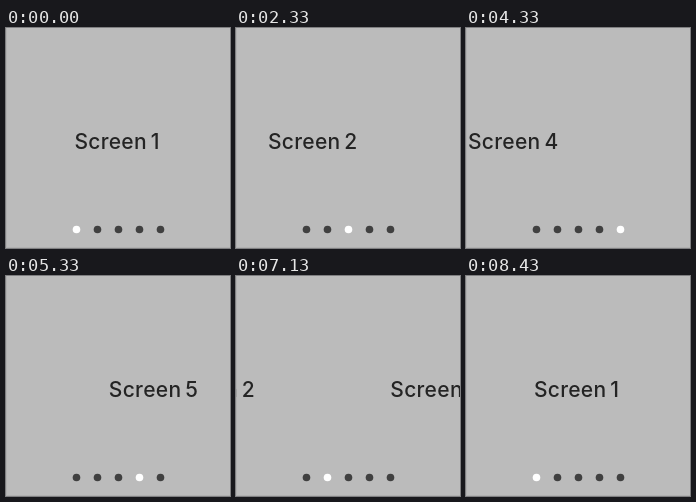
Recreate the animation shown at these times as an HTML page. Size 224 px wide and 220 px high, loop 8.53 s.

```html
<!DOCTYPE html>
<html lang="en">
<head>
<meta charset="utf-8">
<title>Paged screens</title>
<style>
  html, body { margin: 0; width: 100%; height: 100%; overflow: hidden; background: #bbb; }
  svg { display: block; width: 224px; height: 220px; overflow: hidden; }
  text { font: 500 21px Inter, sans-serif; letter-spacing: .3px; word-spacing: -2px; fill: #242424; }
  .edge { fill: #b0b0b0; }
</style>
</head>
<body>
<svg viewBox="0 0 224 220">
  <rect width="224" height="220" fill="#bbb"/>
  <rect class="edge" width="1" height="220"/>
  <rect class="edge" y="219" width="224" height="1"/>
  <g id="pages"></g>
  <g id="dots"></g>
</svg>
<script>
const LOOP = 8530, TICK = 100, PHASE = 30, SLIDE = 500, PAGE = 225, COUNT = 5;

// [start ms, page to go to]
const moves = [
  [1256, 1], [2262, 2], [3262, 3], [4231, 4],
  [5262, 3], [6132, 2], [7010, 1], [7962, 0]
];

const pages = document.getElementById('pages');
const dotGroup = document.getElementById('dots');
const dots = [];

function add(parent, tag, attrs) {
  const el = document.createElementNS('http://www.w3.org/2000/svg', tag);
  for (const key in attrs) el.setAttribute(key, attrs[key]);
  return parent.appendChild(el);
}

for (let i = 0; i < COUNT; i++) {
  const label = add(pages, 'text', { x: i * PAGE + (i ? 67.4 : 68.4), y: 120.7 });
  label.textContent = 'Screen ' + (i + 1);
  dots.push(add(dotGroup, 'circle', { cx: 70.5 + 21 * i, cy: 201.5, r: 3.8 }));
}

const bezier = (a, b, s) =>
  3 * a * s * (1 - s) ** 2 + 3 * b * s * s * (1 - s) + s ** 3;

// cubic-bezier(.25, .1, .25, 1)
function ease(x) {
  if (x >= 1) return 1;
  let lo = 0, hi = 1;
  for (let i = 0; i < 24; i++) {
    const mid = (lo + hi) / 2;
    if (bezier(.25, .25, mid) < x) lo = mid; else hi = mid;
  }
  return bezier(.1, 1, lo);
}

function draw(ms) {
  // The picture holds still between ticks.
  const t = Math.floor((ms - PHASE) / TICK) * TICK + PHASE;
  let page = 0, position = 0;
  for (const [start, next] of moves) {
    if (t < start) break;
    position = page + (next - page) * ease((t - start) / SLIDE);
    page = next;
  }
  pages.setAttribute('transform', `translate(${-position * PAGE} 0)`);
  dots.forEach((dot, i) => dot.setAttribute('fill', i === page ? '#fff' : '#404040'));
}

const begin = performance.now();
function frame() {
  draw((performance.now() - begin) % LOOP);
  requestAnimationFrame(frame);
}
frame();
</script>
</body>
</html>
```
